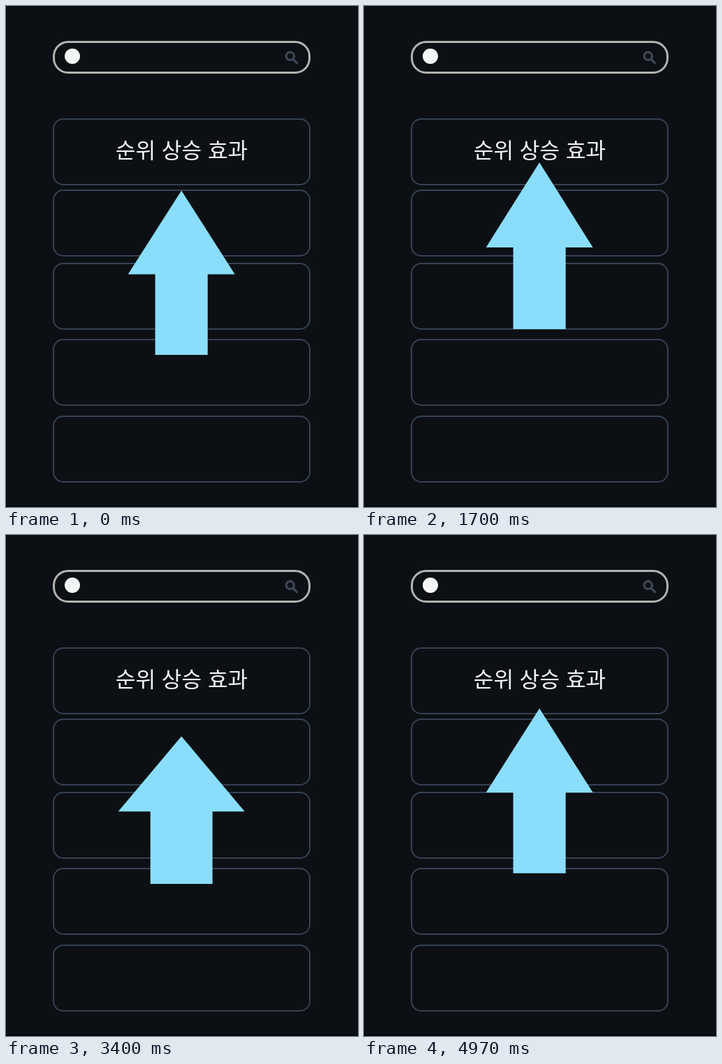
Animation, 504 px wide and 718 px high, one loop 5.01 s. Source, as an HTML page:

```html
<!DOCTYPE html>
<html lang="ko">
<head>
<meta charset="utf-8">
<title>순위 상승 효과</title>
<style>
  html, body { margin: 0; width: 100%; height: 100%; overflow: hidden; background: #0c1014; }
  svg { display: block; width: 504px; height: 718px; }
  .card { fill: none; stroke: #364252; stroke-width: 2; }
  .search { fill: none; stroke: #b2b3b0; stroke-width: 3; }
  .lens { fill: none; stroke: #3c4655; stroke-width: 3.4; }
  text { font: 500 31.2px "Noto Sans CJK KR", "Noto Sans CJK", sans-serif; fill: #f3f5f5; text-anchor: middle; }
</style>
</head>
<body>
<svg viewBox="0 0 504 718">
  <rect width="504" height="718" fill="#0c1014"/>
  <rect y="716" width="504" height="2" fill="#05070a"/>
  <rect class="search" x="68.5" y="51.5" width="366" height="44" rx="20.5"/>
  <circle cx="95" cy="72" r="11" fill="#f4f6f6"/>
  <g class="lens">
    <circle cx="406.8" cy="71.8" r="5.6"/>
    <path d="M411 76L417.4 82.6"/>
  </g>
  <g id="cards"></g>
  <text x="251.5" y="217.5">순위 상승 효과</text>
  <path id="arrow" fill="#8adefb"/>
</svg>
<script>
  const LOOP = 5010;
  const FPS = 30;
  const POSES = 8;
  const POSE_FRAMES = 3.91;   // video frames per pose
  const FIRST_POSE = 7.38;    // frame at which the first squash begins
  const CENTER = 251.2;
  const GROUND = 500;
  const JUMP = 49.5;

  document.getElementById("cards").innerHTML = [162, 264, 369, 478, 588]
    .map(y => `<rect class="card" x="68" y="${y}" width="367" height="94" rx="14"/>`)
    .join("");

  const arrow = document.getElementById("arrow");

  // Squash on the ground for two poses, leap to the peak, then ease back down.
  function arrowPath(pose) {
    const squash = Math.max(0, 1 - pose / 2);
    const fall = Math.min(1, (pose - 2.15) / 3);
    const rise = pose < 2 ? 0 : (1 + Math.cos(Math.PI * fall)) / 2;

    const height = 235.5 - 24 * squash ** 0.68 + 5 * rise ** 2;
    const tip = GROUND - height - JUMP * rise + 5 * rise ** 2;
    const base = tip + 0.51 * height;
    const bottom = tip + height;
    const head = 76.5 + 14 * squash;
    const stem = 0.491 * head;
    const x = offset => CENTER + offset;
    return `M${x(0)} ${tip}L${x(head)} ${base}H${x(stem)}V${bottom}H${x(-stem)}V${base}H${x(-head)}Z`;
  }

  function draw(now) {
    const frame = Math.floor((now % LOOP + 4) * FPS / 1000);
    const step = Math.floor((frame - FIRST_POSE) / POSE_FRAMES);
    arrow.setAttribute("d", arrowPath((step + POSES) % POSES));
  }

  const start = performance.now();
  function tick() {
    draw(performance.now() - start);
    requestAnimationFrame(tick);
  }
  tick();
</script>
</body>
</html>
```
